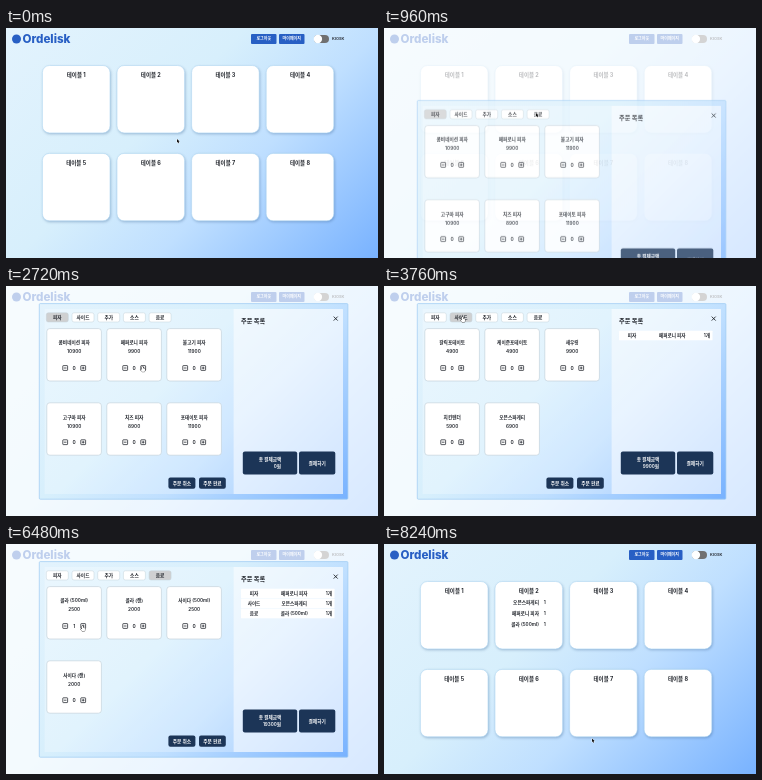
These frames come from a looping animation (372 px wide and 230 px high, 8320 ms). An HTML page with a canvas:

```html
<!DOCTYPE html>
<html lang="ko">
<head>
<meta charset="utf-8">
<title>Ordelisk</title>
<style>
html, body { margin: 0; width: 100%; height: 100%; overflow: hidden; background: #fff; }
canvas { display: block; width: 372px; height: 230px; }
</style>
</head>
<body>
<canvas id="stage"></canvas>
<script>
const W = 372, H = 230, LOOP = 8320, STEP = 80;
const FONT = 'Inter, "Noto Sans CJK KR", "Noto Sans CJK JP", "Noto Sans CJK", sans-serif';
const scale = Math.max(1, Math.ceil(window.devicePixelRatio || 1));
const INK = '#20242b', NAVY = '#1c3557', BLUE = '#285fc4';

const stage = document.getElementById('stage');
const layer = document.createElement('canvas');
for (const c of [stage, layer]) { c.width = W * scale; c.height = H * scale; }
const screen = stage.getContext('2d'), sheet = layer.getContext('2d');
let g = screen;

const TABS = ['피자', '사이드', '추가', '소스', '음료'];
const MENU = {
  0: [['콤비네이션 피자', 10900], ['페퍼로니 피자', 9900], ['불고기 피자', 11900],
      ['고구마 피자', 10900], ['치즈 피자', 8900], ['포테이토 피자', 11900]],
  1: [['갈릭포테이토', 4900], ['케이준포테이토', 4900], ['새우링', 9900],
      ['치킨텐더', 5900], ['오븐스파게티', 6900]],
  4: [['콜라 (500ml)', 2500], ['콜라 (캔)', 2000], ['사이다 (500ml)', 2500], ['사이다 (캔)', 2000]]
};
// time, tab, item
const ORDERS = [[2880, 0, 1], [4640, 1, 4], [6480, 4, 0]];
const SIDE_AT = 3760, DRINK_AT = 5200, DONE_AT = 7840;
const PATH = [
  [0, 171, 111], [560, 152, 85], [1280, 152, 85], [1600, 151, 92], [1840, 151, 92],
  [2720, 136, 80.5], [2960, 136, 80.5], [3680, 78, 31], [3880, 78, 31], [4560, 136, 154.5],
  [4720, 136, 154.5], [5040, 153, 31], [5280, 153, 31], [6160, 75.5, 81], [6240, 76, 82],
  [6720, 76, 82], [7600, 207, 195], [7760, 207, 195], [8240, 208, 194.5]
];

const clamp = v => Math.min(1, Math.max(0, v));

// cubic-bezier(.25, .1, .25, 1)
function ease(x) {
  x = clamp(x);
  let lo = 0, hi = 1, s = x;
  for (let i = 0; i < 20; i++) {
    s = (lo + hi) / 2;
    const px = 0.75 * s * (1 - s) + s * s * s;
    if (px < x) lo = s; else hi = s;
  }
  const r = 1 - s;
  return x === 0 || x === 1 ? x : 0.3 * r * r * s + 3 * r * s * s + s * s * s;
}

function box(x, y, w, h, r, fill, stroke, line = 0.6) {
  g.beginPath();
  g.roundRect(x, y, w, h, r);
  if (fill) { g.fillStyle = fill; g.fill(); }
  if (stroke) { g.strokeStyle = stroke; g.lineWidth = line; g.stroke(); }
}

function text(str, x, y, size, { color = INK, weight = 600, align = 'center' } = {}) {
  g.font = `${weight} ${size}px ${FONT}`;
  g.fillStyle = color;
  g.textAlign = align;
  g.textBaseline = 'alphabetic';
  g.fillText(str, x, y + size * 0.37);
}

function lines(color, width, ...segs) {
  g.strokeStyle = color;
  g.lineWidth = width;
  g.beginPath();
  for (const [a, b, c, d] of segs) { g.moveTo(a, b); g.lineTo(c, d); }
  g.stroke();
}

function shadow(color, blur, dx, dy) {
  g.shadowColor = color;
  g.shadowBlur = blur * scale;
  g.shadowOffsetX = dx * scale;
  g.shadowOffsetY = dy * scale;
}
const noShadow = () => shadow('transparent', 0, 0, 0);

function diagonal(x, y, w, h) {
  const k = (w + h) / 4, cx = x + w / 2, cy = y + h / 2;
  const grad = g.createLinearGradient(cx - k, cy - k, cx + k, cy + k);
  grad.addColorStop(0, '#e3f3fd');
  grad.addColorStop(0.4, '#d7effc');
  grad.addColorStop(0.63, '#bfdfff');
  grad.addColorStop(1, '#78b2ff');
  return grad;
}

function button(label, x, y, w, h, r, color, size) {
  box(x, y, w, h, r, color);
  text(label, x + w / 2, y + h / 2, size, { color: '#fff' });
}

function drawPage(filled) {
  g.fillStyle = diagonal(0, 0, W, H);
  g.fillRect(0, 0, W, H);

  box(6, 6.5, 9, 9, 4.5, BLUE);
  text('Ordelisk', 16.5, 11, 11.6, { color: BLUE, weight: 800, align: 'left' });
  button('로그아웃', 245, 6, 25.5, 10, 1, BLUE, 4);
  button('마이페이지', 273, 6, 25.5, 10, 1, BLUE, 4);
  box(308, 7, 15, 8, 4, '#707070');
  box(307.7, 6.8, 8.4, 8.4, 4.2, '#fff');
  text('KIOSK', 326, 11, 4, { align: 'left' });

  for (let i = 0; i < 8; i++) {
    const x = 36.4 + (i % 4) * 74.6, y = i < 4 ? 37.5 : 125.4;
    shadow('rgba(50,90,140,.4)', 3, 0.8, 1.2);
    box(x, y, 67.6, 67.4, 7, '#fff');
    noShadow();
    box(x, y, 67.6, 67.4, 7, null, '#b2d9f4', 0.6);
    text('테이블 ' + (i + 1), x + 33.8, y + 9.4, 5.5, { weight: 700 });
  }
  if (filled) {
    [1, 0, 2].forEach((n, row) => {
      const [, tab, item] = ORDERS[n], y = 58 + row * 11;
      text(MENU[tab][item][0], 155, y, 4.7, { align: 'right' });
      text('1', 160.8, y, 4.7);
    });
  }
}

function stepper(x, y, count) {
  for (const side of [-9, 9]) {
    const cx = x + side;
    box(cx - 2.4, y - 2.4, 4.8, 4.8, 0.5, null, INK, 0.75);
    lines(INK, 0.75, [cx - 1.3, y, cx + 1.3, y]);
    if (side > 0) lines(INK, 0.75, [cx, y - 1.3, cx, y + 1.3]);
  }
  text(count, x, y, 4.9);
}

function drawModal(t) {
  const tab = t >= DRINK_AT ? 4 : t >= SIDE_AT ? 1 : 0;
  const orders = ORDERS.filter(o => t >= o[0]);

  box(33.3, 17.6, 308.6, 195.6, 1, diagonal(33, 17, 309, 196), '#9ccbf3', 0.7);
  box(38.6, 23, 188.9, 185, 0.5, 'rgba(255,255,255,.25)');
  box(227.5, 23, 109.5, 185, 0.5, 'rgba(255,255,255,.65)');

  TABS.forEach((name, i) => {
    const x = 40.3 + i * 25.7;
    box(x, 26.8, 22, 9.2, 2, i === tab ? '#cfd0d1' : '#fff', '#c3d0d9', 0.5);
    text(name, x + 11, 31.3, 4.7);
  });

  MENU[tab].forEach(([name, price], i) => {
    const cx = 68.2 + (i % 3) * 60, y = i < 3 ? 42.6 : 116.8;
    box(cx - 27.4, y, 54.6, 52.4, 3, '#fff', '#bccbd6', 0.6);
    text(name, cx, y + 14, 4.7);
    text(price, cx, y + 23, 4.7);
    const count = orders.some(o => o[1] === tab && o[2] === i) ? 1 : 0;
    stepper(cx, y + 39.4, count);
  });

  text('주문 목록', 235, 35, 6.2, { align: 'left', weight: 700 });
  lines(INK, 0.9, [327.7, 30.6, 331.7, 34.6], [331.7, 30.6, 327.7, 34.6]);

  let total = 0;
  orders.forEach(([, kind, item], i) => {
    const y = 44.8 + i * 10, [name, price] = MENU[kind][item];
    total += price;
    box(235, y, 93.5, 9.4, 0.5, '#fff');
    text(TABS[kind], 248, y + 4.8, 4.6);
    text(name, 288.3, y + 4.8, 4.6);
    text('1개', 326, y + 4.8, 4.6, { align: 'right' });
  });

  box(236.8, 165.6, 54.4, 22.8, 2, NAVY);
  text('총 결제금액', 264, 173.5, 4.7, { color: '#fff' });
  text(total + '원', 275, 180, 4.6, { color: '#fff', align: 'right' });
  button('결제하기', 293, 165.6, 36.3, 22.8, 2, NAVY, 4.7);
  button('주문 취소', 162.4, 191.5, 27, 11.2, 2, NAVY, 4.7);
  button('주문 완료', 193, 191.5, 26.8, 11.2, 2, NAVY, 4.7);
}

function cursorAt(t) {
  let i = 0;
  while (i < PATH.length - 2 && t >= PATH[i + 1][0]) i++;
  const [t0, x0, y0] = PATH[i], [t1, x1, y1] = PATH[i + 1];
  const k = clamp((t - t0) / (t1 - t0)), s = k * k * (3 - 2 * k);
  return [x0 + (x1 - x0) * s, y0 + (y1 - y0) * s];
}

function drawCursor(x, y, hand) {
  const pts = hand
    ? [[0, 0], [1, 0], [1.2, 2], [3.4, 2.6], [3.4, 4.2], [2.8, 5.8], [0, 5.8], [-1.6, 3.6], [-0.9, 3], [0, 3.6]]
    : [[0, 0], [0, 4.2], [1, 3.4], [1.7, 5], [2.5, 4.6], [1.8, 3.1], [3.1, 3]];
  const size = hand ? 0.9 : 0.85;
  g.beginPath();
  pts.forEach(([a, b]) => g.lineTo(x + a * size, y + b * size));
  g.closePath();
  g.lineJoin = 'round';
  g.strokeStyle = hand ? '#222' : '#fff';
  g.lineWidth = 0.7;
  g.stroke();
  g.fillStyle = hand ? '#fff' : '#111';
  g.fill();
}

function overControl(x, y) {
  const plus = [77, 137, 197].some(p => Math.abs(x - p) < 3.5) && [82, 156].some(p => Math.abs(y - p) < 3.5);
  return plus || (y < 36 && x < 166) || (y > 191 && x > 193 && x < 220);
}

function draw(t) {
  const closing = ease((t - 7790) / 430);
  const shown = t < DONE_AT ? ease((t - 766.5) / 419) : 1 - closing;
  const veil = t < DONE_AT ? ease((t - 680) / 300) : 1 - closing;

  g = screen;
  g.setTransform(scale, 0, 0, scale, 0, 0);
  drawPage(t >= DONE_AT);
  g.fillStyle = `rgba(255,255,255,${0.7 * veil})`;
  g.fillRect(0, 0, W, H);

  if (shown > 0) {
    g = sheet;
    g.setTransform(scale, 0, 0, scale, 0, 0);
    g.clearRect(0, 0, W, H);
    drawModal(t);
    g = screen;
    g.globalAlpha = shown;
    g.drawImage(layer, 0, H * (1 - shown), W, H);
    g.globalAlpha = 1;
  }
  const [x, y] = cursorAt(t);
  drawCursor(x, y, shown === 1 && overControl(x, y));
}

const start = performance.now();
function tick() {
  const t = (performance.now() - start) % LOOP;
  draw(Math.floor(t / STEP) * STEP);
  requestAnimationFrame(tick);
}
tick();
</script>
</body>
</html>
```
